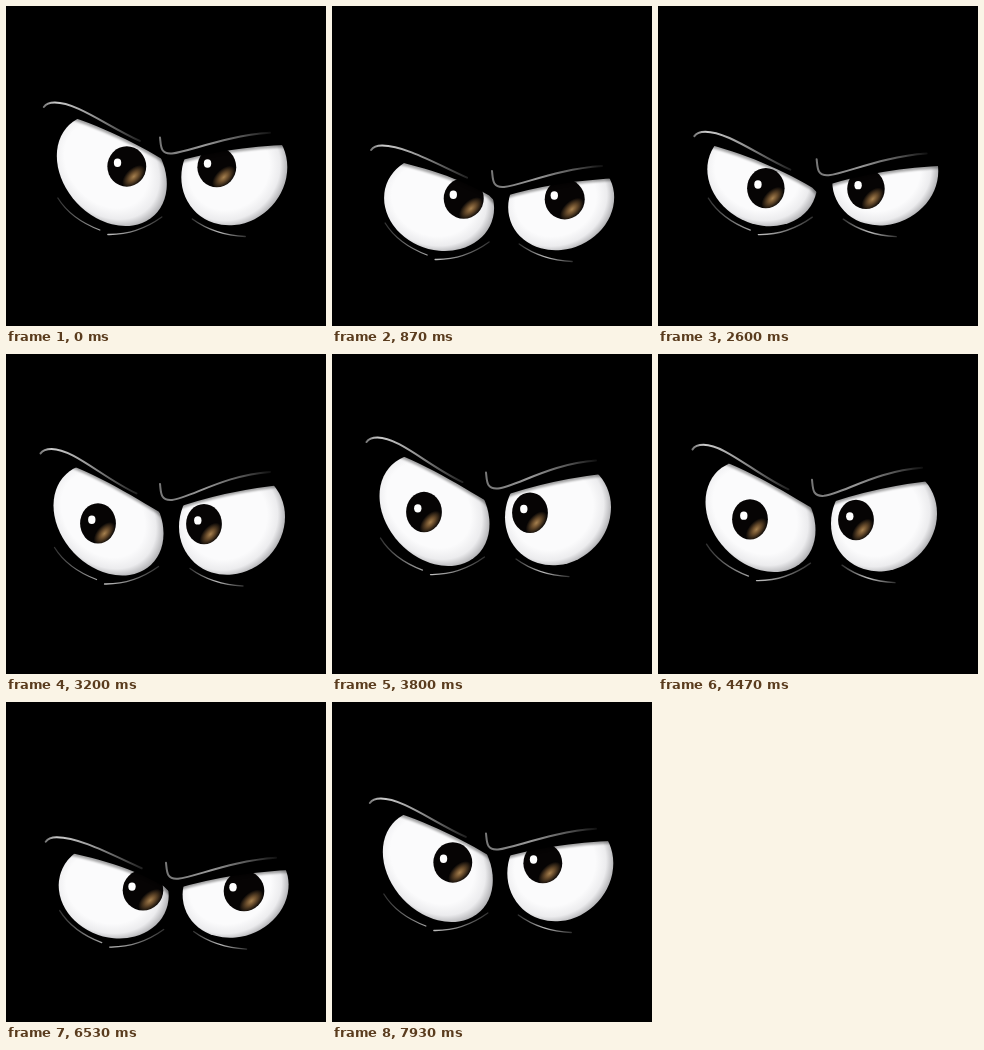
An HTML page that plays this animation: 320x320 px, repeating every 8 s.

```html
<!DOCTYPE html>
<html lang="en">
<head>
<meta charset="utf-8">
<title>Angry eyes</title>
<style>
  html, body { margin: 0; width: 100%; height: 100%; overflow: hidden; background: #000; }
  svg { display: block; width: 100%; height: 100%; }
</style>
</head>
<body>
<svg viewBox="0 0 320 320" fill="none" stroke-linecap="round">
  <defs>
    <radialGradient id="ball" cx=".45" cy=".47" r=".56">
      <stop offset=".68" stop-color="#fbfbfc"/>
      <stop offset=".86" stop-color="#ececee"/>
      <stop offset="1" stop-color="#b0b0b3"/>
    </radialGradient>
    <radialGradient id="glow" gradientTransform="translate(.68 .75) rotate(-42) scale(.36 .2)" cx="0" cy="0" r="1">
      <stop offset="0" stop-color="#a5804f"/>
      <stop offset=".4" stop-color="#6b4e2d"/>
      <stop offset="1" stop-color="#060404"/>
    </radialGradient>
    <linearGradient id="browL">
      <stop offset="0" stop-color="#777"/>
      <stop offset=".12" stop-color="#ccc"/>
      <stop offset=".5" stop-color="#999"/>
      <stop offset="1" stop-color="#222"/>
    </linearGradient>
    <linearGradient id="browR">
      <stop offset="0" stop-color="#777"/>
      <stop offset=".4" stop-color="#999"/>
      <stop offset=".75" stop-color="#555"/>
      <stop offset="1" stop-color="#111"/>
    </linearGradient>
    <linearGradient id="rim">
      <stop offset="0" stop-color="#333"/>
      <stop offset=".5" stop-color="#bbb"/>
      <stop offset="1" stop-color="#333"/>
    </linearGradient>
  </defs>
  <g id="face"></g>
</svg>
<script>
const LOOP = 8000, TICKS = 120;
const face = document.getElementById('face');

function set(el, attrs) {
  for (const k in attrs) el.setAttribute(k, attrs[k]);
  return el;
}

function add(tag, attrs) {
  const el = document.createElementNS('http://www.w3.org/2000/svg', tag);
  return face.appendChild(set(el, attrs));
}

function makeEye(brow) {
  return {
    ball: add('circle', { r: 1, fill: 'url(#ball)' }),
    iris: add('ellipse', { ry: 20.2, fill: 'url(#glow)' }),
    glint: add('ellipse', { rx: 3.7, ry: 4.2, fill: '#fff' }),
    shade: add('path', { stroke: '#000', 'stroke-width': 5, opacity: .35, style: 'filter: blur(1px)' }),
    lid: add('path', { fill: '#000' }),
    brow: add('path', { stroke: `url(#${brow})`, 'stroke-width': 2 }),
    rims: add('path', { stroke: 'url(#rim)', 'stroke-width': 1.3 })
  };
}

const left = makeEye('browL'), right = makeEye('browR');

function ease(t, from, to) {
  const u = Math.min(1, Math.max(0, (t - from) / (to - from)));
  return u * u * (3 - 2 * u);
}

function drawBall(eye, x, bottom, half, height, tilt) {
  const h = Math.sqrt(height * height - tilt * tilt);
  set(eye.ball, { transform: `matrix(${half} ${tilt} 0 ${h} ${x} ${bottom - height})` });
}

function drawPupil(eye, x, y, gaze) {
  set(eye.iris, { cx: x, cy: y, rx: 20.3 - 2.4 * gaze });
  set(eye.glint, { cx: x - 11 + 4.8 * gaze, cy: y - 3.7 });
}

function drawLid(eye, curve, x0, x1) {
  set(eye.shade, { d: curve });
  set(eye.lid, { d: `${curve} L${x1} 0 L${x0} 0Z` });
}

function drawRims(eye, x, y, d) {
  set(eye.rims, { d, transform: `translate(${x} ${y})` });
}

function draw(t) {
  // Drivers: gaze (0 right, 1 left), openness, brow height and eye bottom
  const drop = ease(t, 0, 13), lift = ease(t, 13, 34), rise = ease(t, 46, 64);
  const gaze = .36 * (1 - ease(t, 0, 21)) + ease(t, 27, 47);
  const open = 1 - drop + ease(t, 35, 48), squint = 1 - open;
  const brow = 96.5 + 43 * drop - 13 * lift - 31 * ease(t, 38, 48) - 18 * rise;
  const bottom = 220 + 25 * drop - 26 * lift + 3 * ease(t, 34, 46) - 15 * rise;

  const height = 48 + 8 * open;
  const lookX = 137 - 45 * gaze;
  const lookY = brow + 53 + open * (5 + 16.5 * gaze);

  const x = 107.7 - 5.2 * gaze;
  const inner = brow + 49 + 4 * open + 9.5 * gaze;
  const gap = brow + 8 + 3 * squint;
  drawBall(left, x, bottom, 55, height, 5 + 9 * open);
  drawPupil(left, lookX, lookY, gaze);
  drawLid(left, `M${x - 65} ${gap} C${x - 30} ${gap + 7} ${x + 15} ${inner - 21} ${x + 50} ${inner}`
    + ` L${x + 60} ${inner + 10}`, x - 65, x + 60);
  set(left.brow, { d: `M${x - 68} ${brow + 4.5} Q${x - 65} ${brow} ${x - 57} ${brow}`
    + ` C${x - 35} ${brow} ${x - 5} ${inner - 33} ${x + 28} ${inner - 18}` });
  drawRims(left, x, bottom, 'M-54-28 Q-41-7 -12 4 M-4 8.5 Q25 9 50-9');

  const x2 = 229.6 - 3.6 * gaze, hook = 154 + 6 * squint;
  const near = brow + 25.5 + 9.5 * open;
  const far = brow + 20.5 + open * (14 - 11.5 * gaze);
  drawBall(right, x2, bottom - .7, 53, 48 + 5 * open, -5);
  drawPupil(right, lookX + 101 + open * (25 * gaze - 20), lookY + .7, gaze);
  drawLid(right, `M${hook + 10} ${near + 26} Q${hook + 65} ${(near + far) / 2 + 12} ${hook + 130} ${far + 12}`,
    hook + 10, hook + 130);
  set(right.brow, { d: `M${hook} ${near} C${hook + 1} ${near + 8} ${hook} ${near + 17} ${hook + 12} ${near + 16}`
    + ` C${hook + 30} ${near + 14} ${hook + 65} ${far + 3} ${hook + 110} ${far}` });
  drawRims(right, x2, bottom, 'M-42-7 Q-20 9 11 10.5');
}

function frame(now) {
  // Steps at 15 per second, out and back again
  const i = Math.floor((now % LOOP) * TICKS / LOOP + .06) % TICKS;
  draw(Math.min(i, TICKS - 1 - i));
  requestAnimationFrame(frame);
}

draw(0);
requestAnimationFrame(frame);
</script>
</body>
</html>
```
